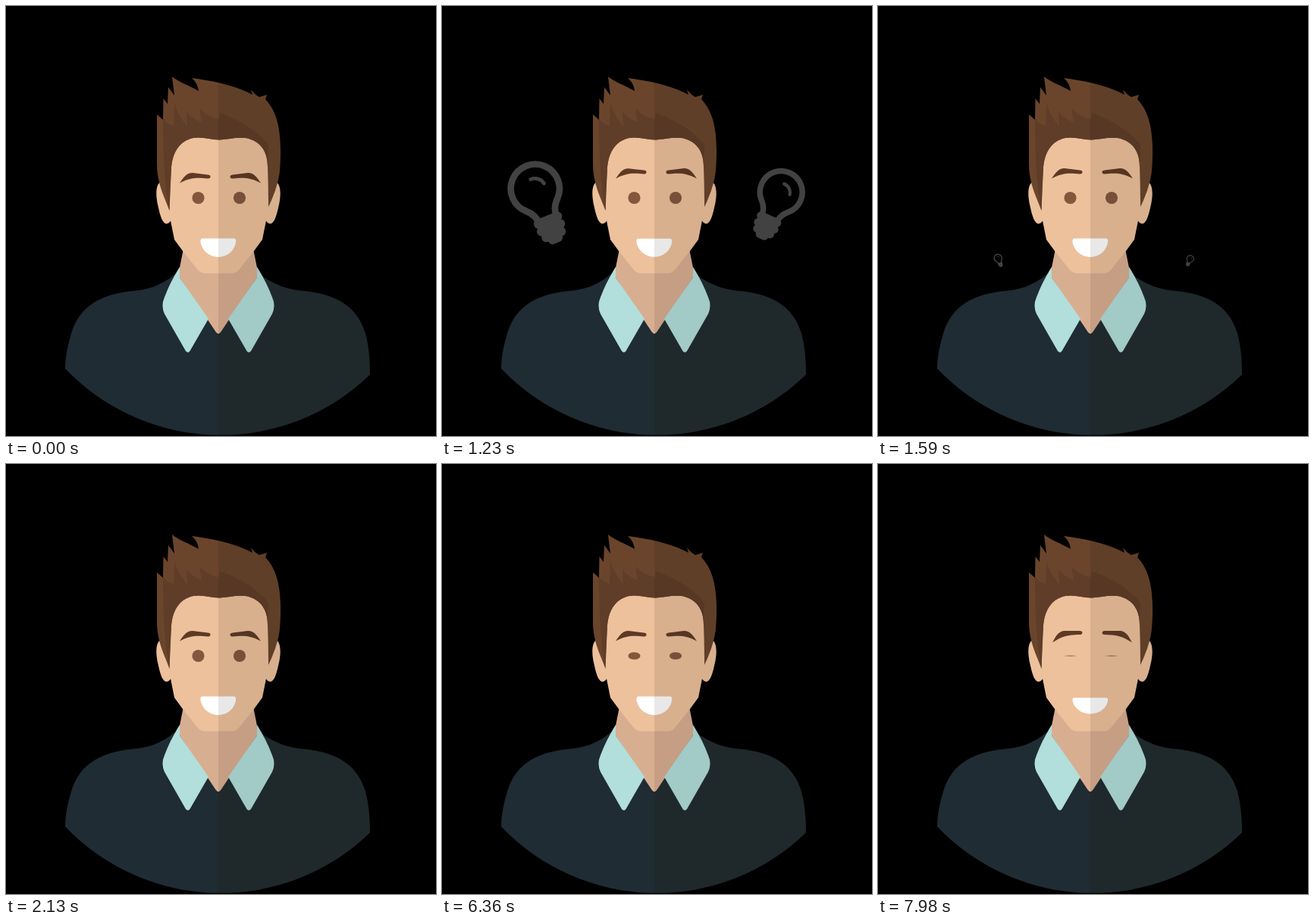
Animation, 567 px wide and 567 px high, one loop 8 s. Source, as an HTML page:

```html
<!DOCTYPE html>
<html lang="en">
<head>
<meta charset="utf-8">
<title>Bright idea</title>
<style>
  html, body { margin: 0; width: 100%; height: 100%; overflow: hidden; background: #000; }
  svg { display: block; width: 100%; height: 100%; }
</style>
</head>
<body>
<svg viewBox="0 0 567 567">
  <defs>
    <linearGradient id="knit" gradientUnits="userSpaceOnUse" x1="279.9" x2="280.1" y1="0" y2="0">
      <stop offset="0" stop-color="#1f2c33"/><stop offset="1" stop-color="#222d2f"/>
    </linearGradient>
    <path id="brow" fill="#5e3a25" d="M229 233.500C234 226 238 220 246 220L266 222.500Q270 223 269.500 225.500Q269 228 266 227.500C252 226 243 226 229 233.500Z"/>
    <g id="bulb" fill="none" stroke="#424242" stroke-linecap="round">
      <path stroke-width="9" d="M-13 46C-13 36 -17 30 -23 24.400A33.500 33.500 0 1 1 23 24.400C17 30 13 36 13 46"/>
      <path stroke-width="5" d="M-1 -14A15 15 0 0 1 14 -2"/>
      <path stroke-width="13" d="M-14 47H14M-14 58H14M-11 68H11M-4 74H4"/>
    </g>
    <!-- left half of neck, collar, ear and face -->
    <g id="half">
      <path fill="#d8ae91" d="M234 320L229 345V358L276.500 429.500Q278 432 281 432V320Z"/>
      <path fill="#b2dedb" d="M229 344V358L267 412.500L242.500 455Q240 458.500 237 455L209 406Q204 395 209 384Q216 365 229 344Z"/>
      <g fill="#edc19c">
        <path d="M204 232C197 235 197 251 201 266C204 280 207 286 211 287Q216 287 218 281L219 240Z"/>
        <path d="M281 165H214V268L222 308L233 323L253 348Q257 352.500 263 352.500H281Z"/>
      </g>
    </g>
  </defs>

  <path fill="url(#knit)" d="M222 354C206 368 186 375 165 376C130 380 98 392 86 432Q78 458 78 478A283 283 0 0 0 480 486Q480 454 474 432C462 392 430 380 395 376C374 375 354 368 335 354Z"/>
  <use href="#half"/>
  <use href="#half" transform="matrix(-1 0 0 1 560 0)"/>

  <!-- hair and its darker fringe -->
  <path fill="#6a452c" d="M215.500 270C210 254 199 235 199 208V143L207 150L207.500 122L213 129L214 107L222 118L219 93C227 100 240 104 254 112Q253 102 245 95C276 99 306 106 325 117L323 110Q328 117 334 120L344 117L342 123C358 140 364 165 361.500 210Q361 234 346 265Q346 238 345 212C345 192 336 178 316 174C302 173 292 176 281 176.500C270 176 258 172 247 174C229 178 220 192 218 213Q216 240 215.500 270Z"/>
  <path fill="#5f3d28" d="M207 148Q212 156 221 158L222 128Q228 146 239 159L238 139Q246 150 258 153L255 135Q266 147 281 149L282 141C305 150 331 163 346 183L345 212C345 192 336 178 316 174C302 173 292 176 281 176.500C270 176 258 172 247 174C229 178 220 192 218 213L215.500 270Q207 230 207 148Z"/>

  <g id="browL"><use href="#brow"/></g>
  <g transform="matrix(-1 0 0 1 565 0)"><g id="browR"><use href="#brow"/></g></g>
  <g fill="#82583d">
    <ellipse class="eye" cx="253.500" cy="253" rx="8"/>
    <ellipse class="eye" cx="308" cy="253" rx="8"/>
  </g>
  <path id="mouth" fill="#fff" d="M259 306.500H300Q304 306.500 303 311C302 322 292 331 280 331C268 331 258 322 256.500 311Q256 306.500 259 306.500Z"/>
  <!-- shaded half -->
  <path fill="#000" opacity=".09" d="M280 80H490V567H280Z"/>
  <g id="bulbL"><use href="#bulb" transform="translate(121 236) rotate(-22)"/></g>
  <g id="bulbR"><use href="#bulb" transform="translate(449 241) rotate(24) scale(.87)"/></g>
</svg>
<script>
const LOOP = 8000, STEP = 30, BLINKS = [1965, 4335, 6405, 7980];

const el = id => document.getElementById(id);
const eyes = document.querySelectorAll('.eye');
const clamp = u => Math.min(1, Math.max(0, u));
const move = (id, value) => el(id).setAttribute('transform', value);
const scaleFrom = (x, y, sx, sy) => `translate(${x} ${y}) scale(${sx} ${sy}) translate(${-x} ${-y})`;

// Eased rise from 0 to 1 between two times.
function ramp(t, from, to) {
  const u = clamp((t - from) / (to - from));
  return u * u * (3 - 2 * u);
}

function draw(t) {
  const idea = ramp(t, 960, 1260);
  const ponder = ramp(t, 0, 420) - idea;
  const surprise = idea - ramp(t, 1800, 2130);
  const relax = ramp(t, 7530, 7980);

  const tilt = 7 * (ponder + relax);
  const lift = -6 * surprise - .5 * (ponder + relax);
  move('browL', `translate(0 ${lift}) rotate(${-tilt} 249 225)`);
  move('browR', `translate(0 ${lift - 4 * ponder}) rotate(${-tilt} 249 225)`);
  move('mouth', scaleFrom(280, 319, 1, 1 - .8 * ponder - .13 * relax));

  const open = Math.min(...BLINKS.map(b => clamp(Math.abs(t - b) / 75)));
  for (const eye of eyes) eye.setAttribute('ry', Math.max(.5, 8 * open));

  const pop = 1.03 * Math.sin(Math.PI * clamp((t - 990) / 630));
  move('bulbL', scaleFrom(165, 350, pop, pop));
  move('bulbR', scaleFrom(405, 350, pop, pop));
}

const start = performance.now();
function tick() {
  const t = (performance.now() - start) % LOOP;
  draw(Math.floor(t / STEP) * STEP);
  requestAnimationFrame(tick);
}
tick();
</script>
</body>
</html>
```
